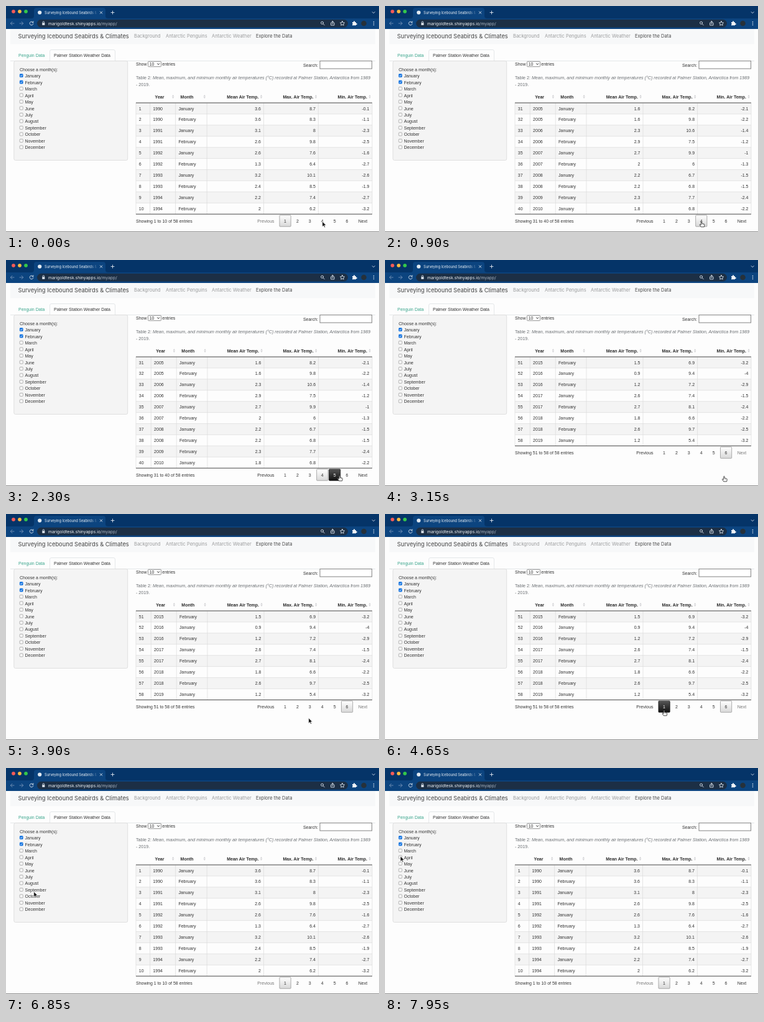
These frames come from a looping animation (600x364 px, 8 s). An HTML page:

```html
<!DOCTYPE html>
<html lang="en">
<head>
<meta charset="utf-8">
<title>Weather table</title>
<style>
  html, body { margin: 0; width: 100%; height: 100%; overflow: hidden; background: #fdfdfd; }
  svg { display: block; width: 600px; height: 364px; }
  text { font: 7px "Liberation Sans", Arial, sans-serif; fill: #333; white-space: pre; }
  .ui { font-family: Inter, sans-serif; }
  .th { font-weight: 700; fill: #2b2b2b; }
  .icon { fill: none; stroke: #dfe7f0; stroke-width: .9; stroke-linecap: round; stroke-linejoin: round; }
</style>
</head>
<body>
<svg viewBox="0 0 600 364" xmlns="http://www.w3.org/2000/svg">
  <defs>
    <linearGradient id="current" x2="0" y2="1"><stop stop-color="#fff"/><stop offset="1" stop-color="#d8d8d8"/></linearGradient>
    <linearGradient id="hover" x2="0" y2="1"><stop stop-color="#565656"/><stop offset="1" stop-color="#111"/></linearGradient>
    <linearGradient id="fade"><stop stop-color="#0c447f" stop-opacity="0"/><stop offset="1" stop-color="#0c447f"/></linearGradient>
  </defs>
  <rect width="600" height="364" fill="#fdfdfd"/>
  <g id="chrome"></g>
  <g id="page"></g>
  <g id="table"></g>
  <path d="M0 363.5H600" stroke="#8d8d8d"/>
  <g id="arrow"><path d="M0 0V8.6L2 6.8L3.4 9.8L4.8 9.2L3.5 6.3H6.2Z" fill="#111" stroke="#fff" stroke-width=".7"/></g>
  <g id="hand"><path d="M-.7.7Q0-.3.7.7V3.4L3.9 4.1Q5 4.4 4.8 5.6L4.2 8.8H-.8L-3 5.6Q-3.2 4.5-2.2 4.7L-.8 5.8Z" fill="#fff" stroke="#222" stroke-width=".8" stroke-linejoin="round"/><path d="M1.7 4.5V6M3 4.7V6" stroke="#555" stroke-width=".4"/></g>
</svg>
<script>
const $ = id => document.getElementById(id);
const LOOP = 8000, ROW = 17.92, TOP = 156;

const text = (x, y, s, attrs = '') => `<text x="${x}" y="${y + 2.5}" ${attrs}>${s}</text>`;
const rect = (x, y, w, h, attrs) => `<rect x="${x}" y="${y}" width="${w}" height="${h}" ${attrs}/>`;
const dot = (x, y, r, fill) => `<circle cx="${x}" cy="${y}" r="${r}" fill="${fill}"/>`;
const path = (d, attrs) => `<path d="${d}" ${attrs}/>`;
const icon = d => path(d, 'class="icon"');
const END = 'text-anchor="end"', MID = 'text-anchor="middle"';

function drawChrome() {
  const ui = (size, fill) => `class="ui" style="font-size:${size}px;fill:${fill}"`;
  $('chrome').innerHTML =
    rect(0, 0, 600, 21, 'fill="#053468"') +
    rect(0, 20, 600, 17, 'fill="#0c447f"') +
    ['#fc5b57', '#fcbb40', '#34c84a'].map((c, i) => dot(12 + 10 * i, 8.8, 2.9, c)).join('') +
    path('M41 20Q45 20 45 16V7Q45 3 49 3H156Q160 3 160 7V16Q160 20 164 20Z', 'fill="#0c447f"') +
    dot(54.2, 10.5, 3.1, '#e2eaf2') +
    text(62, 10.6, 'Surveying Icebound Seabirds &amp;', ui(5.7, '#f4f7fa') + ' font-weight="500"') +
    rect(134, 5, 13, 12, 'fill="url(#fade)"') + rect(147, 5, 3, 12, 'fill="#0c447f"') +
    icon('M151.4 8.9L154.8 12.3M154.8 8.9L151.4 12.3M169 10.5H174M171.5 8V13M589.2 9.6L591.2 11.6L593.2 9.6') +
    rect(50, 21.8, 500, 12.6, 'rx="6.3" fill="#1c2f45"') +
    path('M13 28H7.5M10 25.3L7.3 28L10 30.7M22 28H27.5M25 25.3L27.7 28L25 30.7',
      'class="icon" style="stroke:#7594b8"') +
    icon('M43.4 26.2A2.9 2.9 0 1 0 43.9 28.7M43.9 24.8V26.8H41.9') +
    rect(58.2, 27.2, 4.2, 3.5, 'rx=".5" fill="#dfe7f0"') + icon('M59 27.2V26.2A1.3 1.3 0 0 1 61.6 26.2V27.2') +
    text(68, 28, 'marigoldtesk.shinyapps.io<tspan fill="#a9b4c1">/myapp/</tspan>', ui(6.8, '#f4f7fa')) +
    icon('M510.6 27.2A2 2 0 1 0 506.6 27.2A2 2 0 1 0 510.6 27.2M510.2 28.8L512.3 30.9') +
    icon('M524 27H522.7V31H528V27H526.7M525.3 29V24.4M523.9 25.7L525.3 24.3L526.7 25.7') +
    icon('M541 24.4L542.1 26.7L544.6 27L542.8 28.7L543.2 31.2L541 30L538.8 31.2L539.2 28.7L537.4 27L539.9 26.7Z') +
    path('M557 26H559A1.2 1.2 0 1 1 561.2 26H563V28A1.2 1.2 0 1 1 563 30V31.3H557V29.7A1.1 1.1 0 0 0 557 27.6Z', 'fill="#f0f3f7"') +
    dot(575.6, 28, 4.3, '#26313a') +
    [25.5, 28, 30.5].map(y => dot(591.5, y, .8, '#dfe7f0')).join('');
}

function drawPage() {
  const nav = [[206, 'Background'], [257, 'Antarctic Penguins'], [331, 'Antarctic Weather'], [402, 'Explore the Data']];
  const months = 'January February March April May June July August September October November December'.split(' ');
  $('page').innerHTML =
    rect(7, 37, 587, 24.5, 'fill="#f7f8f9"') +
    text(19.5, 49.2, 'Surveying Icebound Seabirds &amp; Climates', 'class="ui" style="font-size:9.3px;fill:#444"') +
    nav.map(([x, s], i) => text(x, 48.6, s, `class="ui" style="font-size:7.5px;fill:${i == 3 ? '#4a4a4a' : '#9b9c9d'}"`)).join('') +
    path('M7 88.5H70.5V73Q70.5 70.5 73 70.5H173Q175.5 70.5 175.5 73V88.5H594', 'fill="none" stroke="#dfe2e5" stroke-width=".8"') +
    text(20, 79.3, 'Penguin Data', 'style="fill:#3aa58c"') +
    text(77, 79.3, 'Palmer Station Weather Data') +
    rect(12.8, 88.5, 182.9, 160, 'rx="2.5" fill="#f4f4f4" stroke="#dadada" stroke-width=".8"') +
    text(22, 102.3, 'Choose a month(s):') +
    months.map((m, i) => {
      const y = 112.6 + 10.48 * i, on = i < 2;
      return rect(22.2, y - 3, 5, 5, `rx=".8" fill="${on ? '#0b6fe0' : '#fff'}" stroke="${on ? '#0b6fe0' : '#808080'}" stroke-width=".6"`) +
        (on ? path(`M23.3 ${y - .5}l1 1.2l1.8-2.4`, 'fill="none" stroke="#fff" stroke-width=".9"') : '') +
        text(30.5, y, m);
    }).join('') +
    text(209, 93.5, 'Show') + text(251.3, 93.5, 'entries') +
    rect(228.5, 89.3, 21, 8.4, 'rx="1" fill="#fff" stroke="#777" stroke-width=".8"') +
    text(230.7, 93.5, '10') + path('M243.3 92.4l1.9 2l1.9-2', 'fill="none" stroke="#222" stroke-width="1"') +
    text(502, 95, 'Search:', END) +
    rect(505, 88.6, 83.6, 12.4, 'fill="#fff" stroke="#777" stroke-width=".9"') +
    text(209, 115.5, 'Table 2: <tspan font-style="italic">Mean, maximum, and minimum monthly air temperatures (°C) recorded at Palmer Station, Antarctica from 1989</tspan>', 'style="font-size:7.12px;fill:#6b6f73"') +
    text(209, 126.3, '- 2019.', 'style="font-size:7.12px;fill:#6b6f73" font-style="italic"');
}

// mean, max, min for each row of a page
const DATA = {
  1: '3.6 8.7 -0.1,3.6 8.3 -1.1,3.1 8 -2.3,2.6 9.8 -2.5,2.6 7.6 -1.6,1.3 6.4 -2.7,3.2 10.1 -2.6,2.4 8.5 -1.9,2.2 7.4 -2.7,2 6.2 -3.2',
  4: '1.6 8.2 -2.1,1.6 9.8 -2.2,2.3 10.6 -1.4,2.9 7.5 -1.2,2.7 9.9 -1,2 6 -1.3,2.2 6.7 -1.5,2.2 6.8 -1.5,2.3 7.7 -2.4,1.8 6.8 -2.2',
  6: '1.5 6.9 -3.2,0.9 9.4 -4,1.2 7.2 -2.9,2.6 7.4 -1.5,2.7 8.1 -2.4,1.8 6.6 -2.2,2.6 9.7 -2.5,1.2 5.4 -3.2'
};
const rowsOf = page => DATA[page].split(',').map(r => r.split(' '));
const buttonTop = page => TOP + ROW * rowsOf(page).length + 1.8;

// One month (January 2009) is missing from the records.
function dateOf(n) {
  const k = n < 39 ? n - 1 : n;
  return [1990 + (k >> 1), k % 2 ? 'February' : 'January'];
}

function drawTable(page, hover) {
  const rows = rowsOf(page), first = page * 10 - 9, last = first + rows.length - 1;
  const wide = page > 1;
  const edges = wide ? [209, 233.3, 274.3, 324, 415, 502.6, 589] : [209, 231.6, 272.6, 323.2, 414.5, 502.4, 589];
  const bottom = TOP + ROW * rows.length;
  let out = '';

  ['Year', 'Month', 'Mean Air Temp.', 'Max. Air Temp.', 'Min. Air Temp.'].forEach((h, i) => {
    const right = edges[i + 2];
    out += i < 2 ? text(edges[i + 1] + 8, 146, h, 'class="th"') : text(right - 8, 146, h, 'class="th" ' + END);
    out += path(`M${right - 5.6} 145.4l1.7-2.5l1.7 2.5zm0 1.2l1.7 2.5l1.7-2.5z`, 'fill="#d0d0d3"');
  });

  rows.forEach((r, i) => {
    const y = TOP + ROW * i, c = y + 9, n = first + i, [year, month] = dateOf(n);
    if (i % 2 == 0) out += rect(209, y, 380, ROW, 'fill="#f4f4f4"');
    if (i) out += path(`M209 ${y}H589`, 'stroke="#dcdcdc" stroke-width=".7"');
    out += text(213.8, c, n) + text(edges[1] + 4.8, c, year) + text(edges[2] + 4.8, c, month) +
      r.map((v, j) => text(edges[j + 4] - 4.5, c, v, END)).join('');
  });
  out += edges.map(x => path(`M${x} ${TOP}V${bottom}`, 'stroke="#dcdcdc" stroke-width=".7"')).join('');
  out += path(`M209 ${TOP}H589M209 ${bottom}H589`, 'stroke="#333" stroke-width=".9"');

  const y = buttonTop(page), c = y + 9.3;
  const tone = off => `style="fill:${off ? '#777' : '#333'}"`;
  out += text(209, c, `Showing ${first} to ${last} of 58 entries`);
  out += text(404.3, c, 'Previous', tone(page == 1)) + text(566.7, c, 'Next', tone(page == 6));
  for (let p = 1; p <= 6; p++) {
    const x = buttonX(p), on = p == page, over = p == hover && !on;
    if (on || over) out += rect(x - 9, y, 18.2, 18.2,
      `rx=".8" fill="url(#${on ? 'current' : 'hover'})" stroke="${on ? '#999' : '#111'}" stroke-width=".8"`);
    out += text(x, c, p, MID + (over ? ' style="fill:#fff"' : ''));
  }
  $('table').innerHTML = out;
}

const buttonX = p => 449 + 19.9 * (p - 1);

// time, x, y of the pointer tip
const MOVES = [
  [0, 508.8, 347], [150, 509.2, 347], [1850, 509.2, 347], [2300, 536.5, 347], [2600, 545.5, 348],
  [3500, 545.5, 348], [4200, 449, 316], [5300, 449, 316], [5550, 447, 310.5],
  [6000, 447, 310.5], [6800, 45, 200], [7500, 24.8, 142], [LOOP, 24.8, 142]
];

function pointerAt(t) {
  const i = MOVES.findIndex(m => m[0] > t), a = MOVES[i - 1], b = MOVES[i];
  const u = (t - a[0]) / (b[0] - a[0]), e = u * u * (3 - 2 * u);
  return [a[1] + (b[1] - a[1]) * e, a[2] + (b[2] - a[2]) * e];
}

const pageAt = t => t < 500 ? 1 : t < 2850 ? 4 : t < 5300 ? 6 : 1;

function hoverAt(t, x, y, page) {
  const top = buttonTop(page);
  if (t < 100 || y < top || y > top + 18.2) return 0;
  return [1, 2, 3, 4, 5, 6].find(p => Math.abs(x - buttonX(p)) < 9.9) || 0;
}

let drawn = '';
function render(t) {
  const [x, y] = pointerAt(t), page = pageAt(t), hover = hoverAt(t, x, y, page);
  const key = page + '/' + hover;
  if (key != drawn) drawTable(page, hover);
  drawn = key;
  const still = (t > 2850 && t < 3520) || (t > 5300 && t < 6050);
  const hand = hover > 0 || still;
  for (const id of ['arrow', 'hand']) {
    $(id).setAttribute('transform', `translate(${x.toFixed(2)} ${y.toFixed(2)})`);
    $(id).style.display = (id == 'hand') == hand ? '' : 'none';
  }
}

drawChrome();
drawPage();
const start = performance.now();
function tick() {
  render((performance.now() - start) % LOOP);
  requestAnimationFrame(tick);
}
tick();
</script>
</body>
</html>
```
